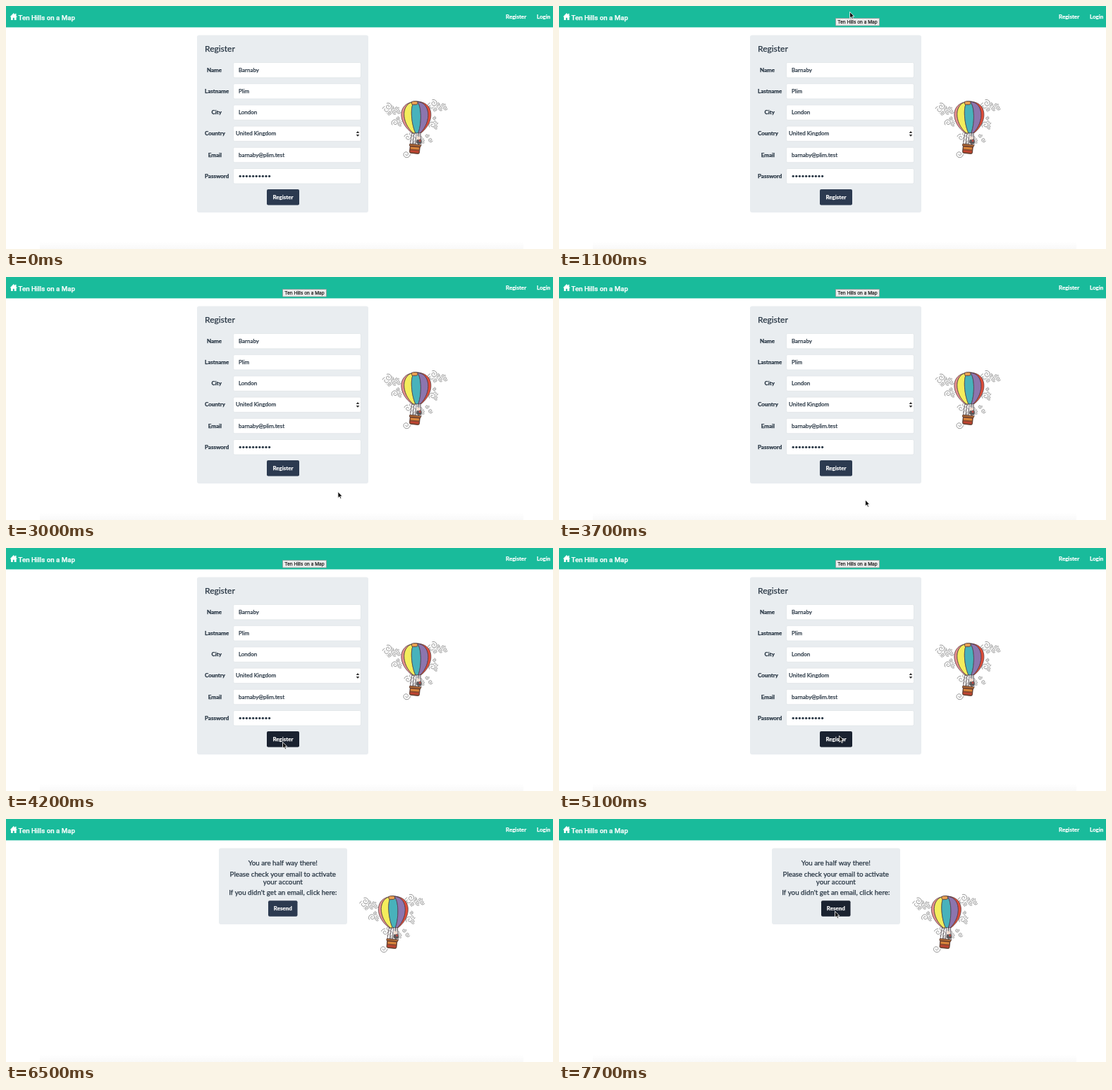
Animation of 776 by 346 pixels, one loop 8000 ms. Source, as an HTML page with a canvas:

```html
<!DOCTYPE html>
<html lang="en">
<head>
<meta charset="utf-8">
<title>Register</title>
<style>
  html, body { margin: 0; width: 100%; height: 100%; overflow: hidden; background: #fff; }
  canvas { display: block; }
</style>
</head>
<body>
<canvas id="stage" width="776" height="346"></canvas>
<script>
const ctx = document.getElementById('stage').getContext('2d');
const LOOP = 8000;
const INK = '#263442';
const BRAND = 'Ten Hills on a Map';
const FIELDS = {
  Name: 'Barnaby',
  Lastname: 'Plim',
  City: 'London',
  Country: 'United Kingdom',
  Email: 'barnaby@plim.test',
  Password: '•'.repeat(10)
};

// Turning points of the pointer as time, x, y; it is hidden outside each path.
const pointerPaths = [
  { end: 5700, keys: [
    [1100, 412, 8], [1300, 411, 84], [2000, 405, 162], [2500, 424, 239],
    [2700, 462, 291], [3200, 476, 315], [3700, 434, 317], [4200, 392, 276],
    [5100, 397, 267], [5200, 452, 167], [5500, 472, 52]
  ] },
  { end: LOOP, keys: [[6900, 406, 122], [7000, 399, 139], [7700, 391, 131]] }
];

function text(str, x, y, size, { color = INK, weight = 400, align = 'left', family = 'Lato' } = {}) {
  ctx.font = `${weight} ${size}px ${family}, sans-serif`;
  ctx.fillStyle = ctx.strokeStyle = color;
  ctx.textAlign = align;
  ctx.lineWidth = 0.25;
  ctx.fillText(str, x, y);
  ctx.strokeText(str, x, y);
}

function box(x, y, w, h, r, fill, stroke) {
  ctx.beginPath();
  ctx.roundRect(x, y, w, h, r);
  ctx.fillStyle = fill;
  ctx.fill();
  if (stroke) {
    ctx.strokeStyle = stroke;
    ctx.lineWidth = 0.8;
    ctx.stroke();
  }
}

function disc(x, y, r, fill) {
  ctx.beginPath();
  ctx.arc(x, y, r, 0, 7);
  ctx.fillStyle = fill;
  ctx.fill();
}

function triangle(x, y, halfWidth, height) {
  ctx.beginPath();
  ctx.moveTo(x, y);
  ctx.lineTo(x + halfWidth, y + height);
  ctx.lineTo(x - halfWidth, y + height);
  ctx.fill();
}

function button(label, x, y, w, hovered) {
  box(x, y, w, 22.5, 2, hovered ? '#1a2230' : '#2c3a50');
  text(label, x + w / 2, y + 13.6, 8, { color: '#fff', weight: 700, align: 'center' });
}

function header() {
  ctx.fillStyle = '#19bb9b';
  ctx.fillRect(0, 0, 776, 30.4);
  ctx.fillStyle = '#fff';
  triangle(10.8, 10, 5.2, 5.6);
  ctx.fillRect(13, 10.8, 1.5, 3);
  ctx.fillRect(7, 15, 2.8, 5);
  ctx.fillRect(11.8, 15, 2.8, 5);
  ctx.fillRect(9, 15, 3.5, 1.8);
  const link = { color: '#fff', weight: 700 };
  text(BRAND, 17.5, 20, 9.7, { color: '#fff', weight: 500, family: 'Roboto' });
  text('Register', 709, 18.3, 8, link);
  text('Login', 753, 18.3, 8, link);
}

function bottomShade() {
  const shade = ctx.createLinearGradient(0, 335, 0, 346);
  shade.addColorStop(0, 'rgba(0,0,0,0)');
  shade.addColorStop(1, 'rgba(0,0,0,.025)');
  ctx.fillStyle = shade;
  ctx.fillRect(48, 335, 686, 11);
}

function curl(x, y, r, turn) {
  disc(x, y, r, '#fff');
  ctx.beginPath();
  for (let u = 0; u <= 1; u += 0.03) {
    const a = turn + u * 10;
    const d = r * (1 - u * 0.9);
    ctx.lineTo(x + d * Math.cos(a), y + d * Math.sin(a));
  }
  ctx.stroke();
}

// Spreads curls evenly over an ellipse by the golden angle.
function cloud(x, y, rx, ry, count) {
  for (let i = 0; i < count; i++) {
    const a = i * 2.4;
    const d = Math.sqrt((i + 0.5) / count);
    curl(x + rx * d * Math.cos(a), y + ry * d * Math.sin(a), 3.8 + 1.4 * Math.sin(i * 2), a);
  }
}

function gore(left, right, color) {
  ctx.beginPath();
  ctx.moveTo(0, -22);
  ctx.bezierCurveTo(left * 27, -22, left * 27, 8, left * 6, 23);
  ctx.lineTo(right * 6, 23);
  ctx.bezierCurveTo(right * 27, 8, right * 27, -22, 0, -22);
  ctx.fillStyle = color;
  ctx.fill();
  ctx.stroke();
}

function basket() {
  ctx.beginPath();
  for (let side = -1; side <= 1; side += 0.5) {
    ctx.moveTo(side * 6, 22);
    ctx.lineTo(side * 8 - 1, 41);
  }
  ctx.stroke();
  disc(4, 35, 3.8, '#5a5658');
  disc(3, 30, 2.4, '#f0d9cc');
  disc(5, 34, 1.4, '#ca4941');
  ctx.save();
  ctx.translate(-2, 45);
  ctx.rotate(0.1);
  box(-7, -5, 14, 12, 2, '#8b4930', '#4a2c24');
  box(-6, -2, 12, 3, 0, '#d9873c');
  box(-6, 3, 12, 2.5, 0, '#c24332');
  box(-8, -6, 16, 3, 1, '#b06a38', '#4a2c24');
  ctx.restore();
}

function balloon(x, y) {
  ctx.save();
  ctx.translate(x, y);
  ctx.strokeStyle = '#666';
  ctx.lineWidth = 0.7;
  cloud(-35, -10, 11, 6, 9);
  cloud(-27, 6, 7, 5, 4);
  cloud(30, -15, 13, 6, 10);
  cloud(25, 8, 5, 8, 4);
  cloud(2, 30, 20, 8, 9);
  curl(-14, 53, 5.5, 0);

  ctx.strokeStyle = '#4a3940';
  const colors = ['#e69090', '#f4ed5c', '#48b2bb', '#8c75ae', '#df4c38'];
  const edge = i => Math.sin((i / colors.length - 0.5) * Math.PI);
  ctx.save();
  ctx.rotate(-0.04);
  colors.forEach((color, i) => gore(edge(i), edge(i + 1), color));
  box(-6, -22.5, 9, 5, 2.5, '#e8a052', '#4a3940');
  ctx.restore();
  basket();
  ctx.restore();
}

function field(label, value, i) {
  const y = 80.5 + i * 30.2;
  const isSelect = label === 'Country';
  const isLong = label.length > 6;
  text(label, isLong ? 282 : 306, y + 13.2, 8, { weight: 700, align: isLong ? 'left' : 'right' });
  box(322.5, y, 181, 21.5, 2, '#fff', '#e0e5e8');
  if (label === 'Password') {
    for (let dot = 0; dot < value.length; dot++) disc(332.2 + dot * 4.6, y + 10.8, 1.6, INK);
    return;
  }
  text(value, isSelect ? 326 : 330, y + 13.2, 8);
  if (isSelect) {
    ctx.fillStyle = '#333';
    triangle(499, y + 7, 2.3, 2.8);
    triangle(499, y + 14.8, 2.3, -2.8);
  }
}

function registerPage(hovered) {
  box(271, 41.5, 243, 252.5, 3, '#e9edf0');
  text('Register', 282, 64.5, 12);
  Object.entries(FIELDS).forEach(([label, value], i) => field(label, value, i));
  button('Register', 370, 261, 46, hovered);
  balloon(582, 158);
}

function confirmPage(hovered) {
  box(302, 41.5, 182, 108.5, 3, '#e9edf0');
  const line = (str, y) => text(str, 392.8, y, 9.8, { align: 'center' });
  line('You are half way there!', 66);
  line('Please check your email to activate', 82);
  line('your account', 92.7);
  line("If you didn't get an email, click here:", 108);
  button('Resend', 372, 116.2, 41.5, hovered);
  balloon(549.5, 132);
}

function tooltip() {
  box(392.5, 17.5, 62, 10.5, 0, '#ececec', '#8f9a97');
  text(BRAND, 423.5, 25.2, 6.5, { color: '#222', align: 'center', family: 'Inter' });
}

function heldTime(t) {
  const ms = t % 1000;
  return t - ms + [0, 100, 200, 500, 700].findLast(refresh => refresh <= ms);
}

function pointerAt(t) {
  const path = pointerPaths.find(({ end, keys }) => t >= keys[0][0] && t < end);
  if (!path) return null;
  const from = path.keys.findLast(key => key[0] <= t);
  const to = path.keys.find(key => key[0] > t) || from;
  const u = (t - from[0]) / (to[0] - from[0] || 1);
  return [1, 2].map(axis => from[axis] + (to[axis] - from[axis]) * u);
}

function drawPointer([x, y]) {
  ctx.save();
  ctx.translate(x + 0.5, y + 0.3);
  const arrow = new Path2D('M0 0V9L2.1 7.1L3.6 10.2L5 9.6L3.7 6.5H6.4Z');
  ctx.fillStyle = '#111';
  ctx.strokeStyle = '#fff';
  ctx.lineWidth = 0.8;
  ctx.fill(arrow);
  ctx.stroke(arrow);
  ctx.restore();
}

function draw(t) {
  ctx.fillStyle = '#fff';
  ctx.fillRect(0, 0, 776, 346);
  header();
  bottomShade();
  if (t < 6500) registerPage(t >= 4200 && t < 5200);
  else confirmPage(t >= 6900);
  if (t >= 900 && t < 5700) tooltip();
  const pointer = pointerAt(heldTime(t));
  if (pointer) drawPointer(pointer);
}

const start = performance.now();
function tick() {
  draw((performance.now() - start) % LOOP);
  requestAnimationFrame(tick);
}
tick();
</script>
</body>
</html>
```
